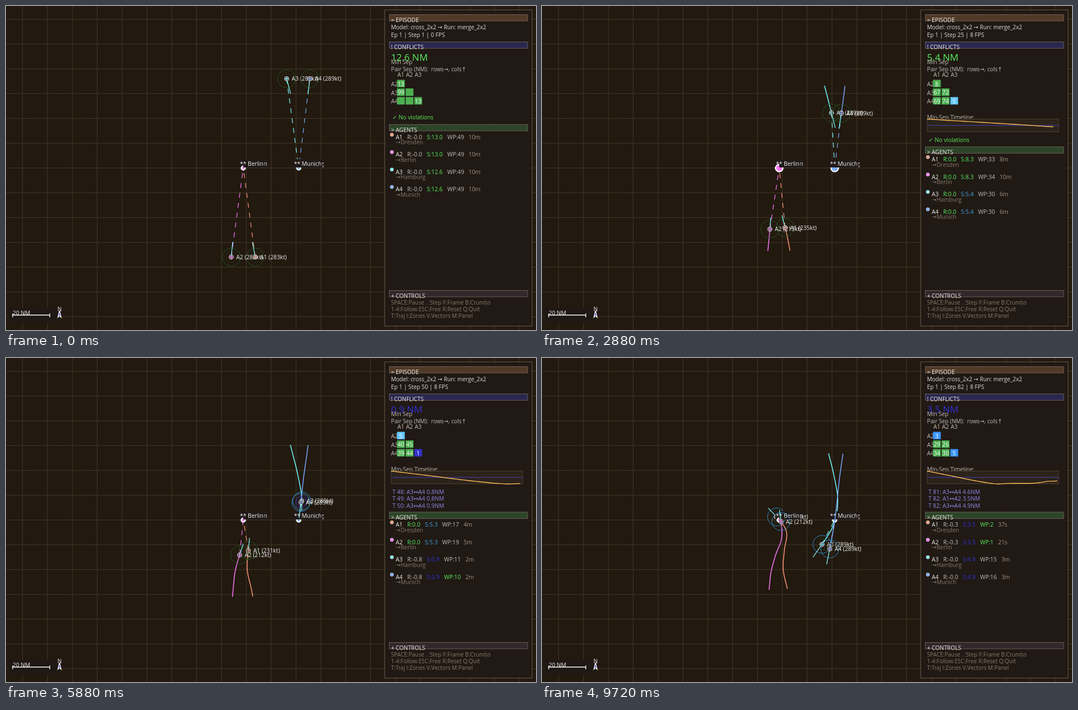
Animation, 956 px wide and 586 px high, one loop 9840 ms. Source, as an HTML page with a canvas:

```html
<!DOCTYPE html>
<html>
<head>
<meta charset="utf-8">
<style>
html, body { margin: 0; width: 956px; height: 586px; overflow: hidden; background: #22190f; }
canvas { display: block; }
</style>
</head>
<body>
<canvas id="stage" width="956" height="586"></canvas>
<script>
const ctx = document.getElementById('stage').getContext('2d');
const STEP_MS = 120, STEPS = 82, PX_PER_NM = 3.32;
const FONT = '"Open Sans", "DejaVu Sans", "Noto Sans", sans-serif';
const GREEN = '#5af05f', BLUE = '#3232dc', WHITE = '#f0f0f0', GREY = '#c4beb8', DIM = '#87796c', BOX = '#211a18';
const WEST = [428, 293], EAST = [528, 293];

// path: key points at equal intervals; speed in knots: cruise + boost * e^(-n/settle) - late slowing
const agents = [
  { name: 'A1', city: 'Dresden', stars: '*', color: '#ff9678', dest: WEST,
    path: [[449.5, 454], [442.5, 417.5], [435.2, 383.2], [437, 348.9], [441, 314.5], [423, 287.4]],
    cruise: 235, boost: 48, settle: 2, slowing: 0.25 },
  { name: 'A2', city: 'Berlin', stars: '**', color: '#ff78ff', dest: WEST,
    path: [[406.3, 454], [409.7, 419], [413, 387.7], [421.2, 357], [432, 326.8], [431, 295.8]],
    cruise: 212, boost: 70, settle: 5, slowing: 0 },
  { name: 'A3', city: 'Hamburg', stars: '*', color: '#78ffff', dest: EAST,
    path: [[506.2, 131.5], [517, 173], [527.1, 215], [533.5, 257.4], [527, 299], [505, 337]],
    cruise: 289, boost: 0, settle: 1, slowing: 0 },
  { name: 'A4', city: 'Munich', stars: '**', color: '#78aaff', dest: EAST,
    path: [[548, 131.5], [542.8, 173.7], [536.8, 216], [532.1, 260], [526.8, 303], [519, 345.3]],
    cruise: 289, boost: 0, settle: 1, slowing: 0 }
];
const pairs = [[0, 1], [2, 3]];

// natural-ended cubic through the key points
function position({ path }, n) {
  const last = path.length - 1, u = (n - 1) / (STEPS - 1) * last;
  const i = Math.min(Math.floor(u), last - 1), t = u - i, t2 = t * t, t3 = t2 * t;
  return [0, 1].map(k => {
    const p = path[i][k], q = path[i + 1][k];
    let m0 = i > 0 ? (q - path[i - 1][k]) / 2 : null;
    let m1 = i < last - 1 ? (path[i + 2][k] - p) / 2 : null;
    m0 ??= 1.5 * (q - p) - m1 / 2;
    m1 ??= 1.5 * (q - p) - m0 / 2;
    return (2 * t3 - 3 * t2 + 1) * p + (t3 - 2 * t2 + t) * m0 + (3 * t2 - 2 * t3) * q + (t3 - t2) * m1;
  });
}

const distance = (p, q) => Math.hypot(p[0] - q[0], p[1] - q[1]);
const separation = (i, j, n) => distance(position(agents[i], n), position(agents[j], n)) / PX_PER_NM;
const ownSep = (i, n) => separation(...pairs[i >> 1], n);
const minSep = n => Math.min(...pairs.map(([i, j]) => separation(i, j, n)));
const knots = (a, n) => a.cruise + a.boost * Math.exp((1 - n) / a.settle) - a.slowing * Math.max(0, n - 34);

function text(str, x, midY, color, size = 10.3) {
  ctx.font = `${size}px ${FONT}`;
  ctx.fillStyle = color;
  ctx.fillText(str, x, midY + size * 0.36);
  return ctx.measureText(str).width;
}

function rect(x, y, w, h, fill, stroke) {
  ctx.fillStyle = fill;
  ctx.fillRect(x, y, w, h);
  if (!stroke) return;
  ctx.strokeStyle = stroke;
  ctx.lineWidth = 1;
  ctx.strokeRect(x, y, w, h);
}

function line(points, color, width = 1, dash = [], fill) {
  ctx.setLineDash(dash);
  ctx.beginPath();
  points.forEach(p => ctx.lineTo(p[0], p[1]));
  if (fill) { ctx.fillStyle = fill; ctx.fill(); }
  ctx.strokeStyle = color;
  ctx.lineWidth = width;
  ctx.stroke();
  ctx.setLineDash([]);
}

function circle([x, y], r, stroke, width = 1, fill, from = 0, to = 7) {
  ctx.beginPath();
  ctx.arc(x, y, r, from, to);
  if (fill) { ctx.fillStyle = fill; ctx.fill(); }
  ctx.strokeStyle = stroke;
  ctx.lineWidth = width;
  ctx.stroke();
}

function drawGrid() {
  rect(0, 0, 956, 586, '#22190f');
  for (let x = 30; x < 956; x += 44.83) line([[x, 0], [x, 586]], '#443828');
  for (let y = 24; y < 586; y += 44.83) line([[0, y], [956, y]], '#443828');
}

function drawCity(agent, n) {
  const west = agent.dest === WEST, left = west ? 421 : 518.5;
  const r = 5 - 1.6 * Math.cos((n - 1) * Math.PI / 8);
  circle(agent.dest, r, '#fff', 2, agent.color);
  const label = `${agent.stars} ${agent.city}`;
  ctx.font = `10.3px ${FONT}`;
  rect(left, 277, ctx.measureText(label).width + 2.5, 15, BOX);
  text(label, left + 1, 285, WHITE);
  if (west) circle(agent.dest, r, '#fff', 2, agent.color, Math.PI / 2, Math.PI * 1.5);
}

function drawAgent(agent, index, n) {
  const p = position(agent, n), [x, y] = p, sep = ownSep(index, n), speed = knots(agent, n);
  const trail = [];
  for (let i = n < 20 ? 1 : 1 + Math.floor(n / 5); i <= n; i++) trail.push(position(agent, i));
  line([p, agent.dest], agent.color, 1.2, [9, 9]);
  drawCity(agent, n);
  line(trail, agent.color, 1.5);
  circle(p, 16.3, sep < 5 ? '#2f88c4' : '#24521f');
  circle(p, 9.8, sep < 3 ? '#3038b8' : '#243319', 0.8);

  const a = position(agent, Math.max(n - 0.3, 1)), b = position(agent, Math.min(n + 0.3, STEPS));
  const k = speed * 0.098 / distance(a, b);
  line([p, [x + (b[0] - a[0]) * k, y + (b[1] - a[1]) * k]], '#82f5f5', 1.3);

  circle(p, 4, '#e6e6e6', 1, '#2a2024');
  circle(p, 2, agent.color);
  line([[x - 4, y], [x + 4, y]], agent.color, 0.8);
  line([[x, y - 4], [x, y + 4]], '#e6e6e6', 0.8);
  text(`${agent.name} (${Math.round(speed)}kt)`, x + 9, y, WHITE);
}

function drawScale() {
  rect(6, 545, 90, 28, '#1f1813');
  text('20 NM', 12, 555, WHITE);
  line([[12, 559], [79, 559]], '#fff', 1.6);
  for (const x of [12, 79]) line([[x, 556], [x, 563]], '#fff', 1.3);
  text('N', 92.8, 548, WHITE);
  line([[96.5, 551], [93.5, 563], [96.5, 560], [99.5, 563], [96.5, 551]], '#fff', 1.2, [], '#5050d2');
}

function header(title, y, fill) {
  rect(691.5, y + 0.5, 249.5, 11.5, fill, '#6c5d58');
  text(title, 694.5, y + 10, '#f0ece8');
}

function drawMatrix(n) {
  for (let row = 1; row < 4; row++) {
    const y = 133.5 + (row - 1) * 15.6;
    text('A' + row, 706 + (row - 1) * 15.6, 124, GREY);
    text('A' + (row + 1), 694.5, y + 8, GREY);
    for (let col = 0; col < row; col++) {
      const v = separation(row, col, n), x = 705.3 + col * 15.6;
      rect(x, y, 14, 13.5, v < 3 ? '#3232c8' : v < 5 ? '#3c96ff' : v < 7.5 ? '#64c8ff' : '#4caf50');
      if (v >= 99.5) continue;
      ctx.textAlign = 'center';
      text(v.toFixed(0), x + 7, y + 7.5, '#fff');
      ctx.textAlign = 'left';
    }
  }
}

function drawTimeline(n) {
  text('Min-Sep Timeline:', 694.5, 201, GREY);
  rect(694.5, 204.5, 237.5, 23, '#2c231a', '#4b3e2f');
  line([[694.5, 216], [932, 216]], '#4040c0');
  const points = [];
  for (let i = 0; i < n; i++) points.push([694.5 + 237.5 * i / n, 229 - 1.95 * minSep(i + 1)]);
  line(points, '#ffbe5a', 1.4);
}

// returns the top of the next section
function drawViolations(y, n) {
  const found = [];
  for (let i = 1; i <= n; i++) {
    for (const [a, b] of pairs) {
      const sep = separation(a, b, i);
      if (sep < 5) found.push(`T ${i}: ${agents[a].name}↔${agents[b].name} ${sep.toFixed(1)}NM`);
    }
  }
  const recent = found.slice(-3);
  if (!recent.length) text('✓ No violations', 697, y, GREEN);
  recent.forEach((s, i) => text(s, 697, y + i * 12.7, '#8f88e6'));
  return y + 12.3 + 12 * Math.max(recent.length - 1, 0);
}

function drawRow(agent, index, y, n) {
  const sep = ownSep(index, n), left = distance(position(agent, n), agent.dest) / PX_PER_NM;
  const minutes = left / knots(agent, n) * 60;
  const arrival = left < 0.3 ? 10 : 0, start = n === 1 ? 0.01 : 0;
  const reward = (arrival - start - Math.max(0, 5 - sep) / 5).toFixed(1);
  circle([696, y - 4], 3, '#e6e6e6', 0.8, agent.color);
  const fields = [
    [agent.name, '#f0ece8'],
    ['R:' + reward, reward[0] === '-' ? GREY : GREEN],
    ['S:' + sep.toFixed(1), sep < 5 ? BLUE : sep < 7.5 ? '#3ca5e6' : GREEN],
    ['WP:' + left.toFixed(0), left < 10.1 ? GREEN : GREY],
    [minutes < 1 ? Math.round(minutes * 60) + 's' : Math.round(minutes) + 'm', '#a09488']
  ];
  let x = 703;
  for (const [s, color] of fields) x += text(s, x, y, color) + 8.3;
  text('→' + agent.city, 703, y + 9.7, DIM);
}

function drawPanel(n) {
  rect(683, 7, 266, 572, 'rgba(33,25,20,0.96)', '#705c4b');
  header('= EPISODE', 15, '#503a26');
  text('Model: cross_2x2 → Run: merge_2x2', 694.5, 38, '#e1dcd7', 10.2);
  text(`Ep 1 | Step ${n} | ${n === 1 ? 0 : 8} FPS`, 694.5, 52.5, '#e1dcd7', 10.2);

  header('! CONFLICTS', 64.5, '#282850');
  const sep = minSep(n);
  text(sep.toFixed(1) + ' NM', 694.5, 93, sep < 5 ? BLUE : GREEN, 17);
  text('Min Sep', 694.5, 101, GREY);
  text('Pair Sep (NM):  rows→, cols↑', 694.5, 114.5, GREY, 10.2);
  drawMatrix(n);
  if (n > 1) drawTimeline(n);
  const top = drawViolations(n > 1 ? 242 : 201.5, n);

  header('> AGENTS', top, '#2c4428');
  agents.forEach((a, i) => drawRow(a, i, top + 23 + i * 31.5, n));

  header('+ CONTROLS', 514, '#32282a');
  ['SPACE:Pause . :Step F:Frame B:Crumbs', '1-4:Follow ESC:Free R:Reset Q:Quit',
   'T:Traj I:Zones V:Vectors M:Panel'].forEach((s, i) => text(s, 694.5, 536.5 + i * 12, DIM, 10));
}

function frame() {
  const n = Math.floor(performance.now() % (STEP_MS * STEPS) / STEP_MS) + 1;
  drawGrid();
  agents.forEach((a, i) => drawAgent(a, i, n));
  drawScale();
  drawPanel(n);
  requestAnimationFrame(frame);
}
frame();
</script>
</body>
</html>
```
